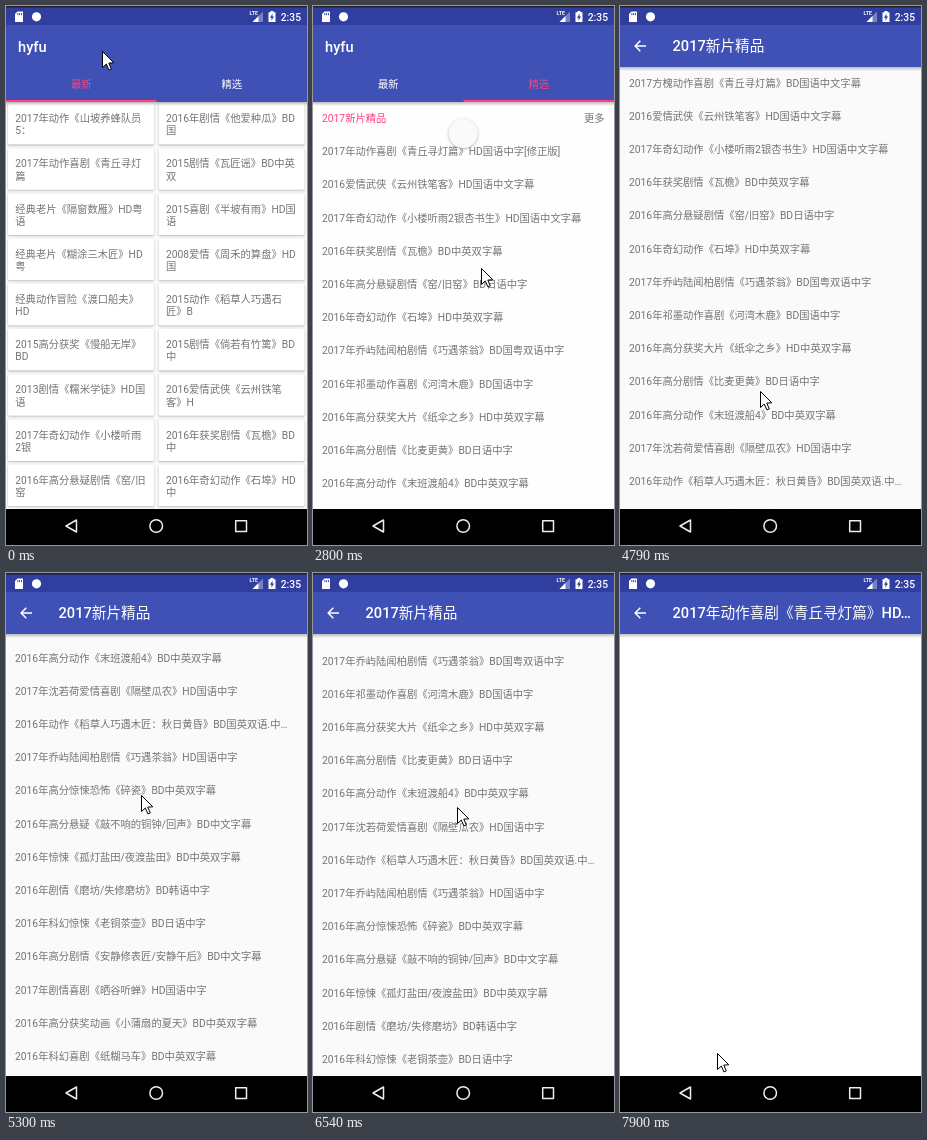
These frames come from a looping animation (301x539 px, 8 s). An HTML page with a canvas:

```html
<!DOCTYPE html>
<html lang="zh-CN">
<head>
<meta charset="utf-8">
<style>
  html, body { margin: 0; width: 100%; height: 100%; overflow: hidden; background: #000; }
  canvas { display: block; width: 301px; height: 539px; }
</style>
</head>
<body>
<canvas id="stage"></canvas>
<script>
const W = 301, H = 539, LOOP = 8000, BEAT = 130;
const STATUS = 19, BAR = 61, TABS = 96, NAV = 503;
const ROW = 33.2, CARD = 45.2, SMALL = 10.3, LARGE = 14.65;
const BLUE = '#3f51b5', DARK = '#303f9f', PINK = '#ff4081', PAPER = '#fafafa', GREY = '#747474';
const FONT = 'Roboto, "Noto Sans CJK SC", "Noto Sans CJK", sans-serif';

const canvas = document.getElementById('stage');
const ctx = canvas.getContext('2d');
const dpr = window.devicePixelRatio || 1;
canvas.width = Math.round(W * dpr);
canvas.height = Math.round(H * dpr);

const leftCards = [
  '2017年动作《山坡养蜂队员|5：', '2017年动作喜剧《青丘寻灯|篇', '经典老片《隔窗数雁》HD粤|语',
  '经典老片《糊涂三木匠》HD|粤', '经典动作冒险《渡口船夫》|HD', '2015高分获奖《慢船无岸》|BD',
  '2013剧情《糯米学徒》HD国|语', '2017年奇幻动作《小楼听雨|2银', '2016年高分悬疑剧情《窑/旧|窑'
];
const rightCards = [
  '2016年剧情《他爱种瓜》BD|国', '2015剧情《瓦匠谣》BD中英|双', '2015喜剧《半坡有雨》HD国|语',
  '2008爱情《周禾的算盘》HD|国', '2015动作《稻草人巧遇石|匠》B', '2015剧情《倘若有竹篱》BD|中',
  '2016爱情武侠《云州铁笔|客》H', '2016年获奖剧情《瓦檐》BD|中', '2016年奇幻动作《石埠》HD|中'
];
const films = [
  '2017方槐动作喜剧《青丘寻灯篇》BD国语中文字幕',
  '2016爱情武侠《云州铁笔客》HD国语中文字幕',
  '2017年奇幻动作《小楼听雨2银杏书生》HD国语中文字幕',
  '2016年获奖剧情《瓦檐》BD中英双字幕',
  '2016年高分悬疑剧情《窑/旧窑》BD日语中字',
  '2016年奇幻动作《石埠》HD中英双字幕',
  '2017年乔屿陆闻柏剧情《巧遇茶翁》BD国粤双语中字',
  '2016年祁墨动作喜剧《河湾木鹿》BD国语中字',
  '2016年高分获奖大片《纸伞之乡》HD中英双字幕',
  '2016年高分剧情《比麦更黄》BD日语中字',
  '2016年高分动作《末班渡船4》BD中英双字幕',
  '2017年沈若荷爱情喜剧《隔壁瓜农》HD国语中字',
  '2016年动作《稻草人巧遇木匠：秋日黄昏》BD国英双语.中…',
  '2017年乔屿陆闻柏剧情《巧遇茶翁》HD国语中字',
  '2016年高分惊悚恐怖《碎瓷》BD中英双字幕',
  '2016年高分悬疑《敲不响的铜钟/回声》BD中文字幕',
  '2016年惊悚《孤灯盐田/夜渡盐田》BD中英双字幕',
  '2016年剧情《磨坊/失修磨坊》BD韩语中字',
  '2016年科幻惊悚《老铜茶壶》BD日语中字',
  '2016年高分剧情《安静修表匠/安静午后》BD中文字幕',
  '2017年剧情喜剧《晒谷听蝉》HD国语中字',
  '2016年高分获奖动画《小蒲扇的夏天》BD中英双字幕',
  '2016年科幻喜剧《纸糊马车》BD中英双字幕',
  '2017年动作喜剧《小住竹溪》HD国语中字',
  '2016年届青禾奖最佳外语片《补碗匠》BD中文字幕'
];
const picks = ['2017年动作喜剧《青丘寻灯篇》HD国语中字[修正版]', ...films.slice(1, 11)];

// Pointer moves: start, end, x, y
const moves = [
  [650, 1550, 150, 279], [1680, 2010, 221, 77], [2540, 2800, 168, 262], [2930, 3330, 279, 108],
  [3840, 3970, 121, 122], [4090, 4750, 140, 385], [4750, 5270, 135, 222], [5270, 5920, 133, 346],
  [5920, 7090, 159, 78], [7220, 7870, 97, 480]
];

const ramp = (t, a, b) => Math.min(1, Math.max(0, (t - a) / (b - a)));
const smooth = p => p * p * (3 - 2 * p);
const easeOut = (p, n) => 1 - (1 - p) ** n;

function pointer(t) {
  let x = 96, y = 45;
  for (const [a, b, toX, toY] of moves) {
    const p = smooth(ramp(t, a, b));
    x += (toX - x) * p;
    y += (toY - y) * p;
  }
  return [x, y];
}

const scroll = t => 388 * (easeOut(ramp(t, 4760, 5780), 2.6) - smooth(ramp(t, 5920, 6940)));

function rect(x, y, w, h, color) {
  ctx.fillStyle = color;
  ctx.fillRect(x, y, w, h);
}

function poly(color, ...p) {
  ctx.beginPath();
  for (let i = 0; i < p.length; i += 2) ctx.lineTo(p[i], p[i + 1]);
  ctx.closePath();
  ctx.fillStyle = color;
  ctx.fill();
}

function disc(x, y, r, color) {
  ctx.beginPath();
  ctx.arc(x, y, r, 0, 7);
  ctx.fillStyle = color;
  ctx.fill();
}

// y is the middle of the capitals
function text(s, x, y, color = GREY, size = SMALL, weight = 400, align = 'left') {
  ctx.font = `${weight} ${size}px ${FONT}`;
  ctx.textAlign = align;
  ctx.fillStyle = color;
  ctx.fillText(s, x, y + size * 0.356);
}

function shadow(y) {
  const g = ctx.createLinearGradient(0, y, 0, y + 4);
  g.addColorStop(0, 'rgba(0,0,0,.25)');
  g.addColorStop(1, 'rgba(0,0,0,0)');
  rect(0, y, W, 4, g);
}

function raised(blur, draw) {
  ctx.save();
  ctx.shadowColor = 'rgba(0,0,0,.3)';
  ctx.shadowBlur = blur * dpr;
  ctx.shadowOffsetY = dpr * 0.8;
  draw();
  ctx.restore();
}

function clip(top, draw) {
  ctx.save();
  ctx.beginPath();
  ctx.rect(0, top, W, NAV - top);
  ctx.clip();
  draw();
  ctx.restore();
}

function cards(list, x) {
  list.forEach((s, i) => {
    const y = 97 + i * CARD;
    raised(2, () => {
      ctx.beginPath();
      ctx.roundRect(x, y, 146, 41.6, 1.5);
      ctx.fillStyle = '#fff';
      ctx.fill();
    });
    s.split('|').forEach((line, n) => text(line, x + 7.3, y + 15.5 + n * 12.2));
  });
}

function spinner(y, scale, turn) {
  if (scale <= 0) return;
  const r = 14.6 * scale;
  raised(2.5, () => disc(150.2, y, r, PAPER));
  if (turn == null) return;
  ctx.beginPath();
  ctx.arc(150.2, y, r * 0.43, turn, turn + 4);
  ctx.strokeStyle = '#444';
  ctx.lineWidth = 1.8 * scale;
  ctx.stroke();
}

function frame(body) {
  rect(0, 0, W, STATUS, DARK);
  rect(0, STATUS, W, NAV - STATUS, body);
  rect(0, NAV, W, H - NAV, '#000');
}

function home(t) {
  const p = smooth(ramp(t, 2410, 2800));
  frame(p < 1 ? PAPER : '#fefefe');
  clip(TABS, () => {
    ctx.translate(-W * p, 0);
    cards(leftCards, 2);
    cards(rightCards, 152.6);
    ctx.translate(W, 0);
    text('2017新片精品', 9, 112, PINK);
    text('更多', 291.5, 112, GREY, SMALL, 400, 'right');
    picks.forEach((s, i) => text(s, 9, 145.6 + i * ROW));
  });
  spinner(127.5, ramp(t, 2540, 2800) - ramp(t, 2800, 3060));
  shadow(TABS);
  rect(0, STATUS, W, TABS - STATUS, BLUE);
  text('hyfu', 12, 40.5, '#fff', LARGE, 500);
  ['最新', '精选'].forEach((s, i) => {
    const active = i === Math.round(p);
    text(s, W / 4 + i * W / 2, 78, active ? PINK : '#fff', SMALL, 500, 'center');
  });
  rect(W / 2 * p, TABS - 2, W / 2, 2, PINK);
}

function toolbar(title) {
  shadow(BAR);
  rect(0, STATUS, W, BAR - STATUS, BLUE);
  ctx.beginPath();
  ctx.moveTo(26, 40);
  ctx.lineTo(15.5, 40);
  ctx.moveTo(20.3, 34.8);
  ctx.lineTo(15.1, 40);
  ctx.lineTo(20.3, 45.2);
  ctx.strokeStyle = '#fff';
  ctx.lineWidth = 1.5;
  ctx.stroke();
  text(title, 52.5, 40.2, '#fff', LARGE, 500);
}

function filmList(t) {
  frame(PAPER);
  if (t > 4300) clip(BAR, () => films.forEach((s, i) => text(s, 9, 77 + i * ROW - scroll(t))));
  spinner(93, ramp(t, 3940, 4070) - ramp(t, 4230, 4490), t / 150);
  toolbar('2017新片精品');
}

function detail() {
  frame('#fff');
  toolbar('2017年动作喜剧《青丘寻灯篇》HD…');
}

// A window slides up a little while fading in
function enter(t, start, draw) {
  const p = ramp(t, start, start + 200);
  if (!p) return;
  ctx.save();
  ctx.globalAlpha = Math.min(1, p * 2);
  ctx.translate(0, 14 * (1 - easeOut(p, 2)));
  draw(t);
  ctx.restore();
}

function system() {
  rect(0, 0, W, 1.5, '#222');
  poly('#fff', 11.5, 5.5, 17, 5.5, 17, 16, 9, 16, 9, 8);
  for (let i = 0; i < 3; i++) rect(11.4 + i * 1.8, 7, 0.9, 2.2, DARK);
  disc(30.5, 10.8, 4.6, '#fff');

  poly('rgba(255,255,255,.35)', 257, 5.5, 257, 16, 246.5, 16);
  poly('#fff', 252.5, 10, 252.5, 16, 246.5, 16);
  text('LTE', 243.5, 7.6, '#fff', 5.2, 700);
  rect(262.5, 6.3, 7, 9.7, '#fff');
  rect(264.5, 5, 3, 2, '#fff');
  poly(DARK, 266.6, 7.6, 263.9, 11.8, 265.6, 11.8, 265.3, 14.8, 268.1, 10.6, 266.4, 10.6);
  text('2:35', 295, 11, '#fff', SMALL, 500, 'right');

  ctx.strokeStyle = '#eee';
  ctx.lineWidth = 1.5;
  ctx.lineJoin = 'round';
  ctx.beginPath();
  ctx.moveTo(60, 520);
  ctx.lineTo(70.5, 514);
  ctx.lineTo(70.5, 526);
  ctx.closePath();
  ctx.moveTo(156.5, 520);
  ctx.arc(150.2, 520, 6.3, 0, Math.PI * 2);
  ctx.rect(229.7, 514.7, 10.8, 10.8);
  ctx.stroke();
}

function cursor(x, y) {
  ctx.save();
  ctx.translate(Math.round(x) + 0.5, Math.round(y) + 0.5);
  ctx.lineJoin = 'miter';
  poly('#fff', 0, 0, 0, 16, 3.8, 12.6, 6.4, 18.4, 8.8, 17.4, 6.3, 11.6, 11.3, 11.3);
  ctx.strokeStyle = '#000';
  ctx.lineWidth = 1;
  ctx.stroke();
  ctx.restore();
}

function draw(now) {
  // The picture refreshes in beats, like a slow screen recording
  const t = Math.floor((now % LOOP + 60) / BEAT) * BEAT - 60;
  ctx.setTransform(dpr, 0, 0, dpr, 0, 0);
  rect(0, 0, W, H, '#000');
  if (t < 3970) home(t);
  enter(t, 3850, filmList);
  enter(t, 7360, detail);
  system();
  cursor(...pointer(t));
}

const start = performance.now();
function loop() {
  draw(performance.now() - start);
  requestAnimationFrame(loop);
}
loop();
</script>
</body>
</html>
```
